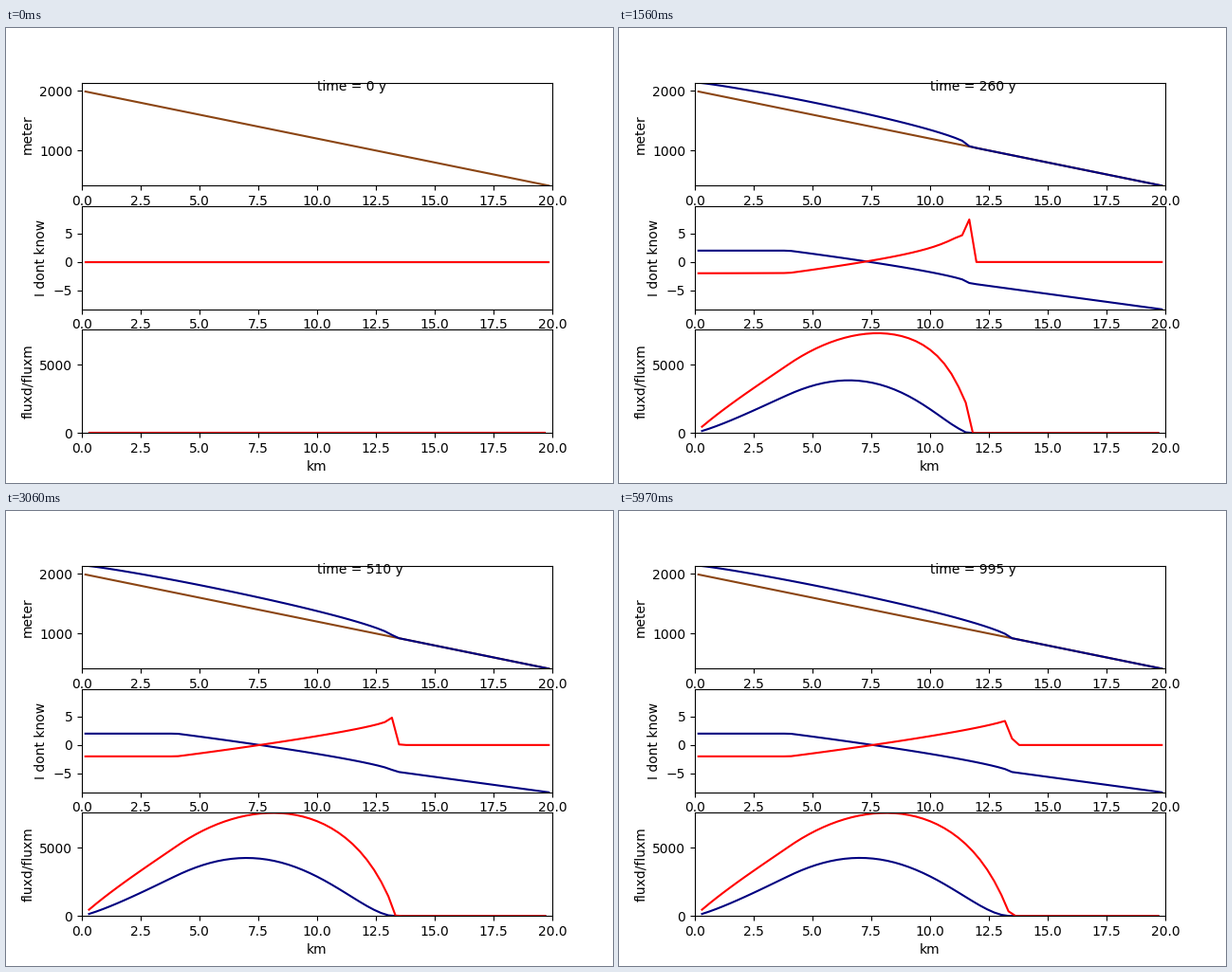
Write a matplotlib script that moves like this. It is 640 by 480 pixels and loops after 6 s.

```python
import numpy as np
import matplotlib.pyplot as plt
from matplotlib.animation import FuncAnimation

# Glacier flowing down a linear slope, cell-centred ice thickness
LENGTH, CELLS = 20000.0, 66
FRAMES, YEARS_PER_FRAME, STEPS = 200, 5, 100
YEAR = 3.1536e7
RHO_G = 924 * 9.81
DEFORM = 0.4 * 1.9e-24 * YEAR * RHO_G**3
SLIDE = 5.7e-20 * YEAR * RHO_G**3
ELA, GRADIENT, MAX_BALANCE = 1600.0, 0.007, 2.0

dx = LENGTH / CELLS
dt = YEARS_PER_FRAME / STEPS
x = (np.arange(CELLS) + 0.5) * dx
edges = np.arange(1, CELLS) * dx
bed = 2000 - 0.08 * x


def balance_at(z):
    return np.minimum(GRADIENT * (z - ELA), MAX_BALANCE)


def fluxes(ice):
    z = bed + ice
    slope = (z[:-1] - z[1:]) / dx
    h = 0.5 * (ice[:-1] + ice[1:])
    drive = (h * slope) ** 3
    return DEFORM * drive * h * h, SLIDE * drive


def simulate():
    surface = np.zeros((FRAMES, CELLS))
    balance = np.zeros((FRAMES, CELLS))
    gain = np.zeros((FRAMES, CELLS))
    deform = np.zeros((FRAMES, CELLS - 1))
    slide = np.zeros((FRAMES, CELLS - 1))
    ice = np.zeros(CELLS)
    total = np.zeros(CELLS + 1)
    for k in range(1, FRAMES):
        for _ in range(STEPS):
            fd, fs = fluxes(ice)
            total[1:-1] = fd + fs
            inflow = (total[:-1] - total[1:]) / dx
            b = balance_at(bed + ice)
            ice = np.maximum(ice + dt * (b + inflow), 0)
        surface[k], balance[k], gain[k] = bed + ice, b, inflow
        deform[k], slide[k] = fd, fs
    return surface, balance, gain, deform, slide


surface, balance, gain, deform, slide = simulate()

fig, (top, mid, low) = plt.subplots(3, 1, figsize=(6.4, 4.8), dpi=100)

top.plot(x / 1000, bed, color="saddlebrown")
surface_line, = top.plot(x / 1000, surface[0], color="navy")
top.set_ylim(bed.min(), surface.max())
top.set_ylabel("meter")
label = top.text(10, 2000, "")

balance_line, = mid.plot(x / 1000, balance[0], color="navy")
gain_line, = mid.plot(x / 1000, gain[0], color="red")
mid.set_ylim(balance_at(bed).min(), 9.8)
mid.set_ylabel("I dont know")

deform_line, = low.plot(edges / 1000, deform[0], color="navy")
slide_line, = low.plot(edges / 1000, slide[0], color="red")
low.set_ylim(0, slide.max())
low.set_ylabel("fluxd/fluxm")
low.set_xlabel("km")

for ax in (top, mid, low):
    ax.set_xlim(0, LENGTH / 1000)
    ax.set_xticks(np.arange(0, 20.1, 2.5))

series = [
    (surface_line, surface),
    (balance_line, balance),
    (gain_line, gain),
    (deform_line, deform),
    (slide_line, slide),
]


def update(k):
    for line, data in series:
        line.set_ydata(data[k])
    label.set_text(f"time = {k * YEARS_PER_FRAME} y")
    return [line for line, _ in series] + [label]


anim = FuncAnimation(fig, update, frames=FRAMES, interval=30, repeat=True,
                     repeat_delay=0, blit=False)
plt.show()
```
